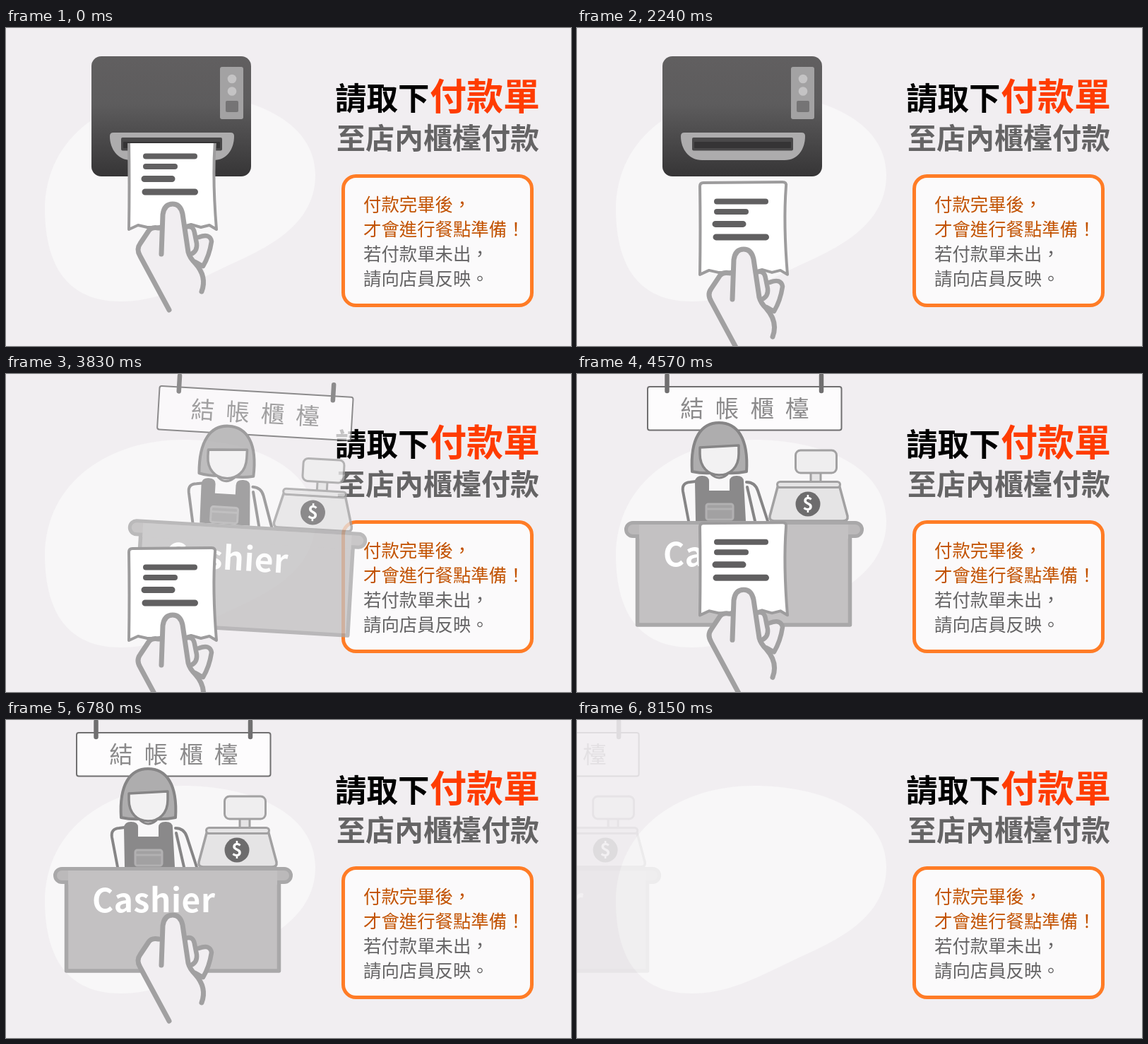
These frames come from a looping animation (800x450 px, 8.21 s). An HTML page with a canvas:

```html
<!DOCTYPE html>
<html lang="zh-Hant">
<head>
<meta charset="utf-8">
<style>
html, body { margin: 0; width: 100%; height: 100%; overflow: hidden; background: #f1eef1; }
canvas { display: block; width: 800px; height: 450px; }
</style>
</head>
<body>
<canvas id="stage" width="800" height="450"></canvas>
<script>
const LOOP = 8210;
const FONT = '"Noto Sans CJK TC", "Noto Sans CJK", "Noto Sans CJK JP", sans-serif';
const BG = '#f1eef1';
const screen = document.getElementById('stage').getContext('2d');
const layerCanvas = document.createElement('canvas');
layerCanvas.width = 800;
layerCanvas.height = 450;
const layer = layerCanvas.getContext('2d');

// [time, vertical offset] of the hand
const HAND_KEYS = [[0, 0], [1500, 55], [2000, 55], [3000, 92], [4300, 92],
  [4580, 55], [5350, 27], [6780, 27], [7030, 190]];

const progress = (t, from, to) => Math.min(1, Math.max(0, (t - from) / (to - from)));

function handOffset(t) {
  let y = HAND_KEYS[0][1];
  for (let i = 1; i < HAND_KEYS.length; i++) {
    const [t0, y0] = HAND_KEYS[i - 1], [t1, y1] = HAND_KEYS[i];
    if (t >= t0) y = y0 + (y1 - y0) * progress(t, t0, t1);
  }
  return y;
}

function paint(c, shape, fill, stroke, width) {
  if (fill) { c.fillStyle = fill; c.fill(shape); }
  if (stroke) {
    c.strokeStyle = stroke;
    c.lineWidth = width;
    c.lineCap = c.lineJoin = 'round';
    c.stroke(shape);
  }
}

const path = (c, d, fill, stroke, width) => paint(c, new Path2D(d), fill, stroke, width);

function box(c, x, y, w, h, r, fill, stroke, width) {
  const shape = new Path2D();
  shape.roundRect(x, y, w, h, r);
  paint(c, shape, fill, stroke, width);
}

function disc(c, x, y, r, fill) {
  const shape = new Path2D();
  shape.arc(x, y, r, 0, 7);
  paint(c, shape, fill);
}

function text(c, str, x, y, size, color, weight = 400, align = 'left') {
  c.font = `${weight} ${size}px ${FONT}`;
  c.fillStyle = color;
  c.textAlign = align;
  c.fillText(str, x, y);
}

function drawBackdrop(c) {
  c.fillStyle = BG;
  c.fillRect(0, 0, 800, 450);
  path(c, `M250 93 C345 93 438 130 438 208 C438 288 352 318 300 343
    C252 366 212 387 163 387 C88 387 56 338 55 258 C55 150 150 93 250 93Z`, '#f8f7f8');
}

function drawMessage(c) {
  text(c, '請取下', 466, 116, 44.5, '#000', 700);
  text(c, '付款單', 600, 116, 52, '#ff3c00', 700);
  text(c, '至店內櫃檯付款', 468, 171, 41, '#656465', 700);
  box(c, 477.5, 209.5, 267, 183, 18, '#fbfafb', '#ff7c26', 5);
  ['付款完畢後，', '才會進行餐點準備！', '若付款單未出，', '請向店員反映。'].forEach((line, i) =>
    text(c, line, 506, 258.5 + i * 35.2, 25.4, i < 2 ? '#c25200' : '#656465'));
}

function drawPrinter(c) {
  const body = c.createLinearGradient(0, 40, 0, 210);
  body.addColorStop(0, '#615f60');
  body.addColorStop(0.4, '#5d5c5d');
  body.addColorStop(1, '#363536');
  box(c, 121, 40, 226, 170, 14, body);
  box(c, 303, 55, 33, 74, 3, '#a3a2a3');
  disc(c, 320, 72, 6.3, '#c4c3c4');
  disc(c, 320, 89.5, 6.3, '#c4c3c4');
  box(c, 311, 103, 18, 16, 2, '#757475');
  path(c, `M152 148 H318 Q323 148 323 153 C323 171 313 187 294 187
    H177 C158 187 147 171 147 153 Q147 148 152 148Z`, '#adacad');
  box(c, 163, 155, 143, 18.5, 2, '#494849');
  box(c, 166, 161, 137, 9, 1, '#353435');
}

function drawSign(c) {
  box(c, 100, 18, 274.5, 61.5, 3, '#fdfcfd', '#706f70', 2);
  path(c, 'M127.5 2 V24 M346 2 V24', null, '#706f70', 6.5);
  [...'結帳櫃檯'].forEach((ch, i) => text(c, ch, 163 + i * 49.6, 60.5, 33.5, '#8b8a8b', 400, 'center'));
}

function drawClerk(c) {
  const line = '#868586';
  path(c, 'M160 210 L150 166 Q148 154 160 152 L190 145 H212 L243 152 Q253 154 257 165 L271 210Z', '#f8f7f8');
  path(c, 'M158 208 L150 166 Q148 154 160 153 L168 152 M240 153 Q252 153 256 165 L270 208', null, line, 4);
  path(c, 'M190 136 V142 Q201 152 213 142 V136Z', '#f2f1f2', line, 3);
  path(c, `M163 138 C160 91 176 69 201 69 C227 69 243 91 240 138
    Q221 142 201 139 Q181 142 163 138Z`, '#aeadae', line, 4);
  path(c, 'M174 104 L229 101 V113 C229 132 217 143 201 143 C186 143 174 132 174 113Z', '#f2f1f2', line, 3.5);
  path(c, `M168 208 L167 152 Q168 144 177 144 Q187 144 187 152 V165 H216 V152
    Q216 144 226 144 Q236 144 236 152 L239 208Z`, '#8a898a');
  box(c, 183, 184, 38, 22, 3, '#a2a1a2', '#b1b0b1', 3);
  path(c, 'M184 191 H220', null, '#b1b0b1', 3);
  path(c, 'M241 160 L252 208', null, line, 4);
}

function drawRegister(c) {
  const line = '#a2a1a2', fill = '#e5e4e5';
  box(c, 331, 139, 14, 16, 0, fill, line, 3);
  box(c, 309.5, 108, 58, 32, 7, '#efeeef', line, 3);
  path(c, 'M284 160 H372 L383 201 Q384 208 377 208 H279 Q272 208 273 201Z', fill, line, 3.5);
  box(c, 283.5, 152.5, 89, 8, 4, fill, line, 3);
  disc(c, 327, 184, 17.5, '#6d6c6d');
  text(c, '$', 327, 193, 26, '#fff', 700, 'center');
}

function drawCounter(c) {
  const fill = '#c3c1c2', line = '#a9a8a9';
  box(c, 85.5, 224, 301, 131, 0, fill, line, 5.5);
  box(c, 69.5, 210.5, 334, 19, 9.5, '#bbb9ba', line, 5);
  c.fillStyle = fill;
  c.fillRect(88, 213, 296, 20);
  c.letterSpacing = '0.6px';
  text(c, 'Cashier', 122, 272, 46, '#fff', 700);
  c.letterSpacing = '0px';
}

function drawReceipt(c) {
  path(c, `M174 160 Q174 155 179 155 L291 154 Q297 154 296 160 Q292 213 298 285
    L288 279 L276 282 L262 278 L244 283 L228 278 L214 282 L200 282 L187 279 L174 285
    Q175 220 174 160Z`, '#fff', '#9d9c9d', 4);
  path(c, 'M198 181.5 H267 M198 196 H239', null, '#616061', 8);
  path(c, 'M196 213.5 H235 M197 232 H267.5', null, '#616061', 9);
}

function drawHand(c) {
  const line = '#a1a0a1';
  path(c, `M231 399 L190 323 Q184 313 190 305 L202 287 Q206 281 216 281 L221 282 L223 263
    Q225 249 236 249 Q247 249 250 263 L253 281 Q264 278 268 292 L271 295
    Q290 290 291 303 Q289 323 279 339 Q285 352 277 373Z`, BG);
  path(c, `M231 399 L190 323 Q184 313 190 305 L202 287 Q206 281 216 283
    M220 320 L222 264 Q224 249 236 249 Q247 249 250 263 L258 317
    Q260 325 268 333 Q285 352 277 373`, null, line, 7);
  path(c, `M254 282 Q265 278 267 290 L270 305 Q271 316 262 320
    M273 296 Q289 290 291 302 Q288 322 279 337 Q275 335 268 331`, null, line, 6.5);
}

// Draws a group as one piece so that overlapping parts fade together.
function drawGroup(alpha, place, ...parts) {
  if (alpha <= 0) return;
  layer.setTransform(1, 0, 0, 1, 0, 0);
  layer.clearRect(0, 0, 800, 450);
  place(layer);
  parts.forEach(part => part(layer));
  screen.globalAlpha = alpha;
  screen.drawImage(layerCanvas, 0, 0);
  screen.globalAlpha = 1;
}

function placeCashier(c, enter, leave) {
  const rest = 1 - enter;
  c.translate(125 + 475 * rest - 331 * leave, 200);
  c.rotate(rest * 15 * Math.PI / 180);
  c.translate(-125, -200);
}

function render(t) {
  drawBackdrop(screen);
  drawMessage(screen);

  const printerLeave = progress(t, 2250, 2900);
  drawGroup(1 - printerLeave, c => c.translate(-286 * printerLeave, 0), drawPrinter);

  const enter = progress(t, 2900, 4100), leave = progress(t, 7500, 8250);
  drawGroup(enter * (1 - leave), c => placeCashier(c, enter, leave),
    drawSign, drawClerk, drawRegister, drawCounter);

  const y = handOffset(t);
  if (t < 6780) {
    screen.save();
    if (t < 2000) {
      screen.beginPath();
      screen.rect(0, 163, 800, 287);
      screen.clip();
    }
    screen.translate(0, y);
    drawReceipt(screen);
    screen.restore();
  }
  drawGroup(1 - progress(t, 6780, 7030), c => c.translate(0, y), drawHand);
}

let start;
function tick(now) {
  start ??= now;
  render((now - start) % LOOP);
  requestAnimationFrame(tick);
}
render(0);
requestAnimationFrame(tick);
</script>
</body>
</html>
```
